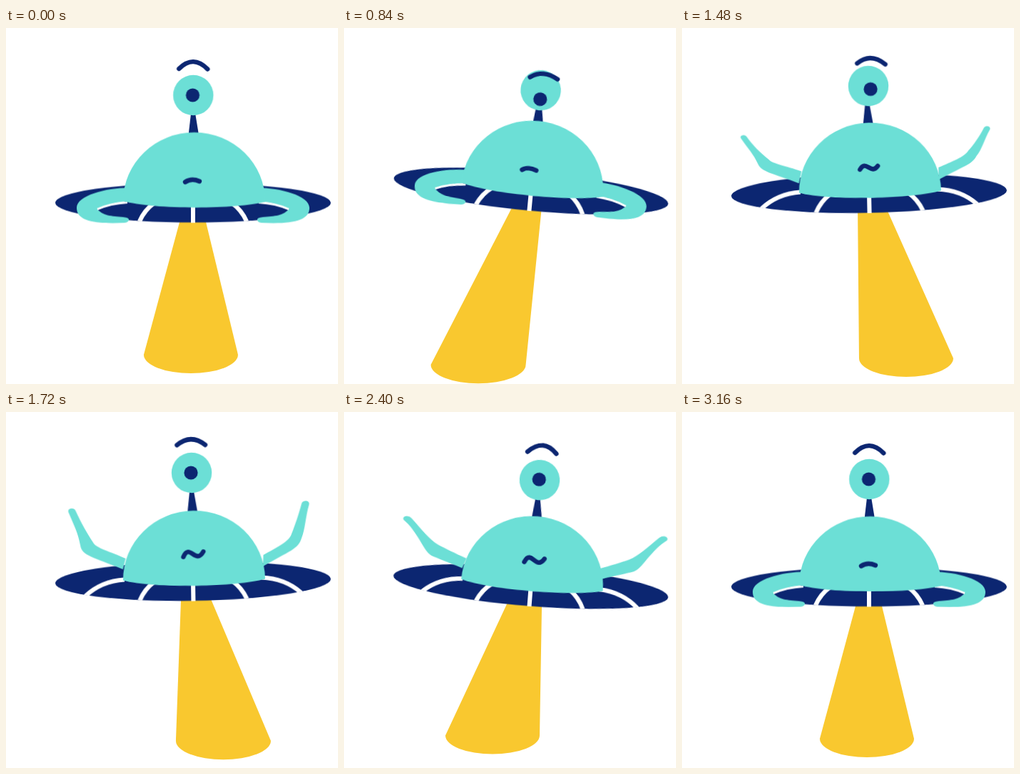
Recreate the animation shown at these times as an HTML page without scripts. Size 465x498 px, loop 3200 ms.

```html
<!DOCTYPE html>
<html lang="en">
<head>
<meta charset="utf-8">
<title>One-eyed saucer</title>
<style>
:root {
  --teal: #6cdfd6;
  --navy: #0c2671;
  --sun: #f9c82f;
  --in: cubic-bezier(.35, 0, .7, .45);
  --out: cubic-bezier(.33, .5, .6, 1);
  --go: cubic-bezier(.33, .2, .67, .75);
  --sway: cubic-bezier(.38, .08, .62, .92);
  --rest: path("M-90,-21C-122,-21 -163,-10 -163,7C-163,25 -140,30 -96,28C-88,27 -88,21 -95,20.5C-112,18 -124,20 -134,9C-120,2 -106,-1 -92,-2Z");
  --droop: path("M-92,-26C-125,-30 -160,-20 -166,-2C-172,15 -172,30 -172,45C-173,50 -166,50 -163,46C-160,30 -155,15 -143,3C-135,-5 -115,-6 -96,-5Z");
  --wide: path("M-94,-30C-120,-31 -132,-27 -142,-25C-165,-20 -185,-12 -199,-9C-205,-6 -203,-2 -197,-3C-180,-8 -165,-11 -145,-11C-130,-12 -115,-9 -98,-7Z");
  --open: path("M-93,-32C-110,-38 -122,-43 -134,-48C-148,-55 -158,-67 -174,-82C-179,-87 -188,-84 -185,-79C-174,-71 -170,-65 -163,-56C-154,-44 -150,-36 -142,-32C-134,-29 -115,-24 -98,-18Z");
}
html, body { margin: 0; width: 100%; height: 100%; overflow: hidden; background: #fff; }
svg { display: block; width: 465px; height: 498px; }
svg * { animation: 3.2s linear infinite; }

.teal { fill: var(--teal); }
.navy { fill: var(--navy); }
.line { fill: none; stroke: #fff; stroke-width: 6; }
.ink { fill: none; stroke: var(--navy); stroke-width: 6.4; stroke-linecap: round; }

#beam { fill: var(--sun); animation-name: beam; }
#ship { animation-name: ship; animation-timing-function: var(--go); }
#eye { animation-name: eye; animation-timing-function: var(--sway); }
#pupil { animation-name: pupil; animation-timing-function: var(--sway); }
#brow { animation-name: brow; animation-timing-function: var(--sway); }
#mouth { animation-name: mouth; animation-timing-function: var(--sway); }
#left { animation-name: left; }
#right { animation-name: right; }
#glint { stroke-width: 3; animation-name: glint; animation-timing-function: step-end; }

@keyframes beam {
  0% { d: path("M247,257L193,457A66,26 0 0 0 325,457L276.5,257Z"); animation-timing-function: var(--in); }
  11.25% { d: path("M242,253L153,464A66,26 0 0 0 285,464L277.5,253Z"); animation-timing-function: var(--out); }
  22.5% { d: path("M239,244L114,471.5A66,26 0 0 0 246,471.5L278,244Z"); animation-timing-function: var(--in); }
  26.25% { d: path("M241,240L121.5,471A66,26 0 0 0 254.5,471L278,240Z"); animation-timing-function: var(--go); }
  38.75% { d: path("M244.7,240L218,464.5A66,26 0 0 0 350,464.5L278.5,240Z"); animation-timing-function: var(--out); }
  46.25% { d: path("M246,245L248,462A66,26 0 0 0 380,462L283,245Z"); animation-timing-function: var(--in); }
  53.75% { d: path("M245.5,250L238,460A66,26 0 0 0 371,460L282,250Z"); animation-timing-function: cubic-bezier(.33, .18, .6, 1); }
  75% { d: path("M234,256L142,452.5A66,26 0 0 0 274,452.5L277.3,256Z"); animation-timing-function: cubic-bezier(.35, 0, .55, 1); }
  98.75%, 100% { d: path("M247,257L193,457A66,26 0 0 0 325,457L276.5,257Z"); }
}
@keyframes ship {
  0% { transform: translate(262px, 244.5px) rotate(0deg); animation-timing-function: var(--in); }
  11.25% { transform: translate(262px, 239.8px) rotate(2.8deg); }
  22.5% { transform: translate(262px, 230.5px) rotate(5.3deg); animation-timing-function: var(--out); }
  26.25% { transform: translate(262px, 228px) rotate(5.35deg); }
  32.5% { transform: translate(262px, 225.5px) rotate(2.6deg); }
  38.75% { transform: translate(262px, 227px) rotate(.1deg); }
  46.25% { transform: translate(262px, 231px) rotate(-1.2deg); }
  53.75% { transform: translate(262px, 236.5px) rotate(-.9deg); animation-timing-function: cubic-bezier(.33, .18, .6, 1); }
  75% { transform: translate(261.7px, 244px) rotate(4.5deg); animation-timing-function: cubic-bezier(.35, 0, .55, 1); }
  98.75%, 100% { transform: translate(262px, 244.5px) rotate(0deg); }
}
@keyframes eye {
  0%, 98.75%, 100% { transform: translate(.3px, -150.5px); }
  11.25% { transform: translate(-3.7px, -139.5px); }
  26.25% { transform: translate(.4px, -141.5px); }
  38.75% { transform: translate(4px, -148.2px); }
  53.75% { transform: translate(.4px, -151.5px); }
  75% { transform: translate(.6px, -149.3px); }
}
@keyframes pupil {
  0%, 98.75%, 100% { transform: translate(-.8px, 0); }
  11.25% { transform: translate(-8.2px, 7.4px); }
  26.25% { transform: translate(.4px, 12.5px); }
  38.75% { transform: translate(7px, 9px); }
  53.75% { transform: translate(-1px, 0); }
  75% { transform: translate(-.8px, -.8px); }
}
@keyframes brow {
  0%, 98.75%, 100% { d: path("M-20,-37Q0,-57 20,-36.5"); }
  11.25% { d: path("M-29.6,-22Q-11,-37 9.5,-23.5"); }
  26.25% { d: path("M-16.6,-17Q0,-29.5 22,-17.5"); }
  38.75% { d: path("M-10,-25Q9,-39 29,-21"); }
  53.75% { d: path("M-20,-39Q0,-55 19.6,-38.7"); }
  75% { d: path("M-20,-38.2Q.4,-59 20.4,-38.5"); }
}
@keyframes mouth {
  0%, 98.75%, 100% { d: path("M-11,-29C-5,-33 2,-33 9,-30"); }
  11.25% { d: path("M-14,-28.5C-8,-32.5 -1,-32.5 6.5,-29.5"); }
  26.25% { d: path("M-15.3,-28.4C-10,-32.4 -3,-32 4.5,-29.2"); }
  38.75% { d: path("M-11,-32.5C-3,-42 3,-27 11,-34.5"); }
  53.75% { d: path("M-13,-34C-4,-54 4,-22 15,-41"); }
  75% { d: path("M-11.8,-33.5C-3.5,-53 5,-22 16,-40"); }
}
@keyframes left {
  0%, 31% { d: var(--rest); animation-timing-function: var(--in); }
  35% { d: var(--droop); }
  38.75% { d: var(--wide); animation-timing-function: var(--out); }
  53.75% {
    d: path("M-94,-33C-115,-43 -135,-48 -139,-56C-148,-70 -155,-83 -163,-101C-165,-106 -175,-105 -173,-99C-165,-79 -160,-70 -157,-52C-155,-38 -140,-36 -98,-18Z");
    animation-timing-function: var(--in);
  }
  75% { d: var(--open); }
  83% { d: var(--wide); }
  88% { d: var(--droop); animation-timing-function: var(--out); }
  94%, 100% { d: var(--rest); }
}
@keyframes right {
  0%, 31% { d: var(--rest); animation-timing-function: var(--in); }
  35% { d: var(--droop); }
  38.75% {
    d: path("M-94,-30C-120,-31 -132,-28 -145,-26C-165,-22 -185,-16 -200,-13C-206,-11 -204,-6 -199,-7C-180,-8 -165,-8 -145,-11C-130,-13 -115,-12 -98,-9Z");
    animation-timing-function: var(--out);
  }
  53.75% {
    d: path("M-99,-35C-115,-44 -136,-53 -139,-64C-144,-76 -149,-90 -154,-107C-157,-112 -166,-110 -164,-104C-159,-88 -158,-70 -153,-58C-148,-42 -135,-40 -98,-19Z");
    animation-timing-function: var(--in);
  }
  75% { d: var(--open); }
  83% { d: var(--wide); }
  88% { d: var(--droop); animation-timing-function: var(--out); }
  94%, 100% { d: var(--rest); }
}
@keyframes glint {
  0%, 94% { opacity: 1; }
  31% { opacity: 0; }
}
</style>
</head>
<body>
<svg viewBox="0 0 465 498">
  <defs>
    <clipPath id="rim"><ellipse rx="193" ry="28"/></clipPath>
    <path id="ribs" d="M-151,18.5C-134,3 -115,-2.5 -96,-3.5M-75,26Q-68,10 -54,0"/>
    <path id="edge" d="M-134,9Q-116,1 -92,-.5"/>
  </defs>
  <path id="beam"/>
  <g id="ship">
    <ellipse class="navy" rx="193" ry="27.5"/>
    <g class="line" clip-path="url(#rim)">
      <use href="#ribs"/>
      <use href="#ribs" transform="scale(-1 1)"/>
      <path d="M0,0V30"/>
    </g>
    <path id="left" class="teal"/>
    <g transform="scale(-1 1)"><path id="right" class="teal"/></g>
    <g id="glint" class="line">
      <use href="#edge"/>
      <use href="#edge" transform="scale(-1 1)"/>
    </g>
    <path class="navy" d="M-2.6,-128H2.6L8,-95H-6.4Z"/>
    <path class="teal" d="M-98,-2.5A99.5,96.5 0 0 1 101,-1.5C60,9.5 -57,9.5 -98,-2.5Z"/>
    <path id="mouth" class="ink"/>
    <g id="eye">
      <circle class="teal" r="28.2"/>
      <circle id="pupil" class="navy" r="9.6"/>
      <path id="brow" class="ink"/>
    </g>
  </g>
</svg>
</body>
</html>
```
